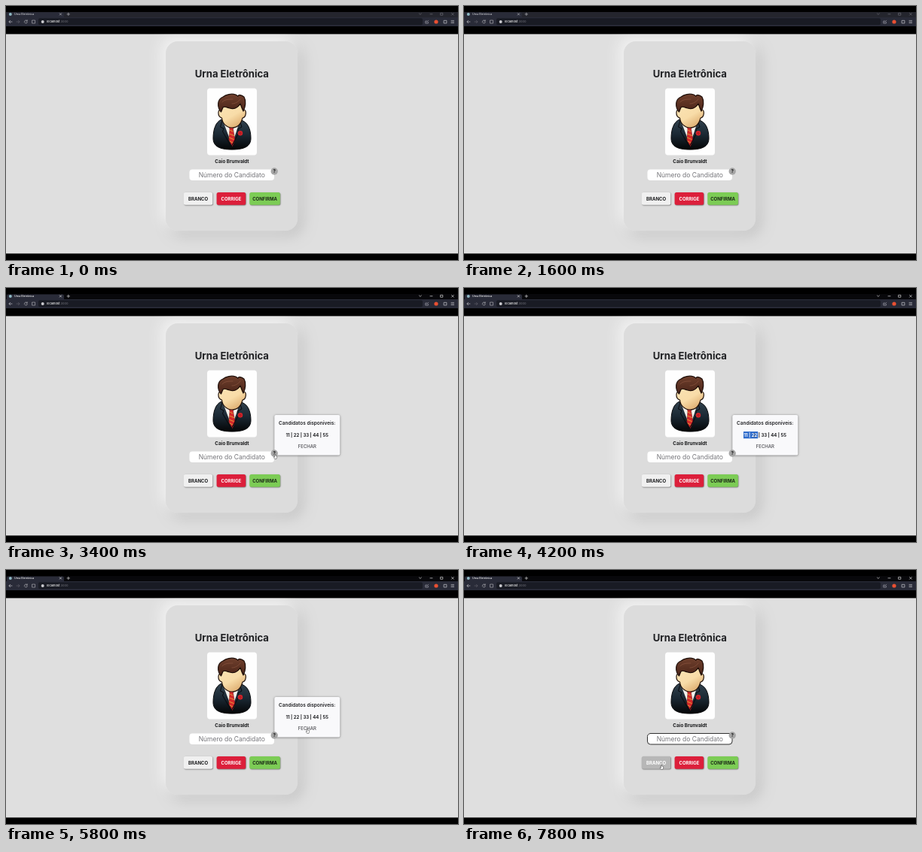
Recreate the animation shown at these times as an HTML page with a canvas. Size 600x338 px, loop 8 s.

```html
<!DOCTYPE html>
<html lang="pt-BR">
<head>
<meta charset="utf-8">
<title>Urna Eletrônica</title>
<style>
  html, body { margin: 0; width: 100%; height: 100%; overflow: hidden; background: #000; }
  canvas { display: block; width: 600px; height: 338px; }
</style>
</head>
<body>
<canvas id="stage"></canvas>
<script>
const W = 600, H = 338, LOOP = 8000, STEP = 200;
const canvas = document.getElementById('stage');
const dpr = window.devicePixelRatio || 1;
canvas.width = W * dpr;
canvas.height = H * dpr;
const c = canvas.getContext('2d');

const FOCUS_WINDOW = 2000;
const POPUP = [3200, 6200];
const SELECT = [4000, 4600, 5600];
const PAGE = [0, 37.4, W, 292];
const CARD = [212, 47, 175, 252, 16, '#dcdcdc'];

// Pointer stops: time, x, y
const route = [
  [2000, 309, 226], [2600, 309, 226], [3000, 357, 221], [3600, 357, 221],
  [4000, 371, 196], [4600, 427, 196], [5200, 427, 196], [5600, 400, 211],
  [6200, 400, 211], [6600, 304, 224], [7000, 304, 224], [7600, 262, 259]
];

const within = (t, a, b) => t >= a && t < b;
const inside = (p, x, y, w, h) => p && p.x >= x && p.x <= x + w && p.y >= y && p.y <= y + h;

function box(x, y, w, h, r, fill, stroke, lw = 1) {
  c.beginPath();
  c.roundRect(x, y, w, h, r);
  if (fill) { c.fillStyle = fill; c.fill(); }
  if (stroke) { c.strokeStyle = stroke; c.lineWidth = lw; c.stroke(); }
}

function shadowBox(x, y, w, h, r, fill, color, dx, dy, blur) {
  c.save();
  c.shadowColor = color;
  c.shadowOffsetX = dx * dpr;
  c.shadowOffsetY = dy * dpr;
  c.shadowBlur = blur * dpr;
  box(x, y, w, h, r, fill);
  c.restore();
}

function text(str, x, y, size, weight, color, align = 'center') {
  c.font = `${weight} ${size}px Inter, sans-serif`;
  c.textAlign = align;
  c.textBaseline = 'alphabetic';
  c.fillStyle = color;
  c.fillText(str, x, y);
}

function disc(x, y, r, fill) {
  c.beginPath();
  c.arc(x, y, r, 0, 7);
  c.fillStyle = fill;
  c.fill();
}

function shape(d, fill, stroke, lw = 1) {
  const p = new Path2D(d);
  if (fill) { c.fillStyle = fill; c.fill(p); }
  if (stroke) {
    c.strokeStyle = stroke;
    c.lineWidth = lw;
    c.lineJoin = c.lineCap = 'round';
    c.stroke(p);
  }
}

function fade(x0, y0, x1, y1, ...colors) {
  const g = c.createLinearGradient(x0, y0, x1, y1);
  colors.forEach((color, i) => g.addColorStop(i / (colors.length - 1), color));
  return g;
}

function browser(active) {
  const ink = active ? '#eeeeee' : '#c4c4ca';
  const dim = active ? '#d8d8d8' : '#6a6a74';
  const bar = '#292b38';
  c.fillStyle = '#000';
  c.fillRect(0, 0, W, H);
  c.fillStyle = active ? '#08080b' : '#24252d';
  c.fillRect(0, 8, W, 7);
  box(1, 8.5, 76, 7, [2, 2, 0, 0], bar);
  c.fillStyle = bar;
  c.fillRect(0, 15, W, 12);
  box(43, 16.3, 510, 9, 2, '#191b24');

  disc(5.8, 11, 2, '#8fb9c4');
  text('Urna Eletrônica', 11, 12.4, 3.6, 500, ink, 'left');
  shape('M71.2 9.7l2.4 2.4m0-2.4l-2.4 2.4M81 10.9h3.6m-1.8-1.8v3.6', null, ink, .6);

  shape('M8 21H4m1.6-1.7L4 21l1.6 1.7', null, '#bcbcc2', .7);
  shape('M14 21h4m-1.6-1.7L18 21l-1.6 1.7', null, '#5c5c66', .7);
  shape('M28 19.7a2 2 0 1 0 .4 1.7M28.2 18.6v1.5h-1.5', null, '#bcbcc2', .6);
  shape('M35 19h3.6v4H35z', null, '#bcbcc2', .6);
  disc(48.7, 21, 2, '#c9c9ce');
  text('localhost', 54, 22.4, 4, 500, '#f4f4f4', 'left');
  const w = c.measureText('localhost').width;
  text(':3000', 54 + w, 22.4, 4, 400, '#77777f', 'left');

  shape('M558.5 20h-1.7v3h3.6v-1.5M558.5 21.5l2.2-2.3', null, '#b8b8bf', .6);
  disc(571, 21, 2.6, '#e95032');
  shape('M581.5 19.3h3.4v3.6h-3.4z', null, '#c9c9cf', .7);
  shape('M591 19.4h3.6m-3.6 1.6h3.6m-3.6 1.6h3.6', null, '#c9c9cf', .6);
  shape('M548.4 10l1.5 1.4 1.5-1.4M563 10.8h3M577 9.4h2.8v2.8H577zM591.5 9.4l2.8 2.8m0-2.8l-2.8 2.8', null, dim, .7);
}

function portrait() {
  box(267, 109.5, 66, 89, 4, '#fefefe');

  // Suit, shirt, tie and flower
  const suit = fade(0, 150, 0, 191, '#33434f', '#1b2934', '#040506');
  shape('M286 151C278 154 275 165 275 176C275 187 284 191 300 191S325 187 325 176C325 164 321 154 312 152Z', suit, '#08090b');
  shape('M288 153L300 185L310 154Z', '#f4f2ec');
  shape('M295.5 160l3-2.5 4 2.5-1 4 2.5 14-3.6 9-4.6-9 1.2-14z', '#d4282b', '#6b1015', .5);
  shape('M297 165l4 2m-4.5 3l6 2.5m-6.4 2.5l6 2.5m-5 2.5l4 2', null, '#e5a83c', .9);
  shape('M287 152L284.5 161L289 163L287.5 167L299 187L309.5 168L307.5 164L313 161L310.5 153', null, '#080a0e');
  disc(311, 169.3, 3.2, '#d5252b');
  shape('M309.5 169.5c0-2 3-2 2.7 0s-2 1.5-1.4.2', null, '#8b1117', .6);

  // Head, with the hair swept to the right
  const skin = fade(290, 132, 308, 162, '#fae2b2', '#f8dca8', '#dcaa6c');
  shape('M286 138C281 136 280 147 286.5 149C287 156 293 162 300 162S312 157 314 149C319 148 320 138 315.5 138L312 127H288Z', skin, '#24150d', 1.2);
  const hair = fade(0, 117, 0, 140, '#70402d', '#4b2519');
  shape('M285.5 141C280 135 280 124 288 121C292 118 299 116 305 118L308 120C309 117 313 119 316 121C319 126 318 134 315 140C314 138 313 136 311 130C308 135 304 138 297 136C293 135 290 133 288 135Z', hair, '#1b0c07', 1.2);
  shape('M287 128c3-4 9-4 14-4M300 130c4 0 8-2 11-6', null, '#8b553f', .7);
}

function button(x, w, label, fill, ink) {
  shadowBox(x, 248, w, 16.8, 2.5, fill, 'rgba(0,0,0,.45)', .6, .6, 1.2);
  text(label, x + w / 2, 258.7, 6, 700, ink);
}

function page(t, p) {
  c.fillStyle = '#dfdfdf';
  c.fillRect(...PAGE);
  c.save();
  c.beginPath();
  c.rect(...PAGE);
  c.clip();
  shadowBox(...CARD, '#c1c1c1', 6.25, 6.25, 19);
  shadowBox(...CARD, '#f4f4f4', -6.25, -6.25, 19);
  c.restore();

  text('Urna Eletrônica', 299.8, 95, 13.1, 700, '#202124');
  portrait();
  text('Caio Brunvaldt', 300, 208.6, 6.3, 700, '#18191b');

  const focused = within(t, FOCUS_WINDOW, POPUP[0]) || t >= 6800;
  box(243.5, 217.5, 112.5, 14.5, 4, '#fff', focused ? '#303030' : null);
  text('Número do Candidato', 299.7, 227.5, 8.5, 400, '#75757a');

  const hover = inside(p, 236, 248, 39, 17);
  button(235.8, 38.6, 'BRANCO', hover ? '#b7b7b7' : '#f0f0f0', hover ? '#fff' : '#1c1d1f');
  button(279.6, 38.6, 'CORRIGE', '#dc1f3b', '#fff');
  button(323.3, 40.6, 'CONFIRMA', '#7ccc55', '#1c2a18');

  if (within(t, ...POPUP)) popup(t);
  disc(356.2, 220, 4.7, '#a6a6a6');
  text('?', 356.2, 222.2, 6.2, 700, '#111');
}

function popup(t) {
  shadowBox(356.3, 169, 87, 53.5, 2, '#f9f9fb', 'rgba(0,0,0,.5)', 0, .5, 3);
  text('Candidatos disponíveis:', 399.7, 182.2, 6.5, 600, '#202124');
  const list = '11 | 22 | 33 | 44 | 55';
  text(list, 399.7, 197.8, 6, 700, '#202124');
  if (within(t, SELECT[0], SELECT[2])) {
    const part = Math.min(1, (t - SELECT[0]) / (SELECT[1] - SELECT[0]));
    c.save();
    c.beginPath();
    c.rect(371, 191, 57.5 * part, 9.5);
    c.clip();
    c.fillStyle = '#2d6bcb';
    c.fillRect(371, 191, 58, 9.5);
    text(list, 399.7, 197.8, 6, 700, '#fff');
    c.restore();
  }
  text('FECHAR', 399.9, 213.4, 6, 500, '#4b4b50');
}

function pointerAt(t) {
  if (t < route[0][0]) return null;
  const i = route.findIndex(s => s[0] > t);
  if (i < 0) {
    const [, x, y] = route[route.length - 1];
    return { x, y };
  }
  const [t0, x0, y0] = route[i - 1], [t1, x1, y1] = route[i];
  const k = (t - t0) / (t1 - t0), e = k * k * (3 - 2 * k);
  return { x: x0 + (x1 - x0) * e, y: y0 + (y1 - y0) * e };
}

function pointer(p, t) {
  if (!p) return;
  const open = within(t, ...POPUP);
  const hand = inside(p, 352, 215, 9, 10) || inside(p, 236, 248, 129, 17) ||
    (open && inside(p, 386, 206, 28, 9));
  const beam = inside(p, 243, 217, 108, 15) || (open && inside(p, 370, 190, 60, 11));
  c.save();
  c.translate(p.x, p.y);
  if (hand) {
    shape('M-.6 0q.6-.8 1.2 0v2l2 .6v2.1L2 6.4H-.4L-2 4.1l.5-.7.9.6z', '#fff', '#333', .5);
  } else if (beam) {
    shape('M-.9-2.4h1.8M0-2.4v4.8M-.9 2.4H.9', null, '#666', .5);
  } else {
    shape('M0 0v5.2l1.2-1.1.9 1.9.8-.4-.9-1.8h1.7z', '#fff', '#222', .45);
  }
  c.restore();
}

function draw(now) {
  const t = Math.floor((now % LOOP) / STEP) * STEP;
  const p = pointerAt(t);
  c.setTransform(dpr, 0, 0, dpr, 0, 0);
  browser(t >= FOCUS_WINDOW);
  page(t, p);
  pointer(p, t);
}

const start = performance.now();
function tick() {
  draw(performance.now() - start);
  requestAnimationFrame(tick);
}
tick();
</script>
</body>
</html>
```
